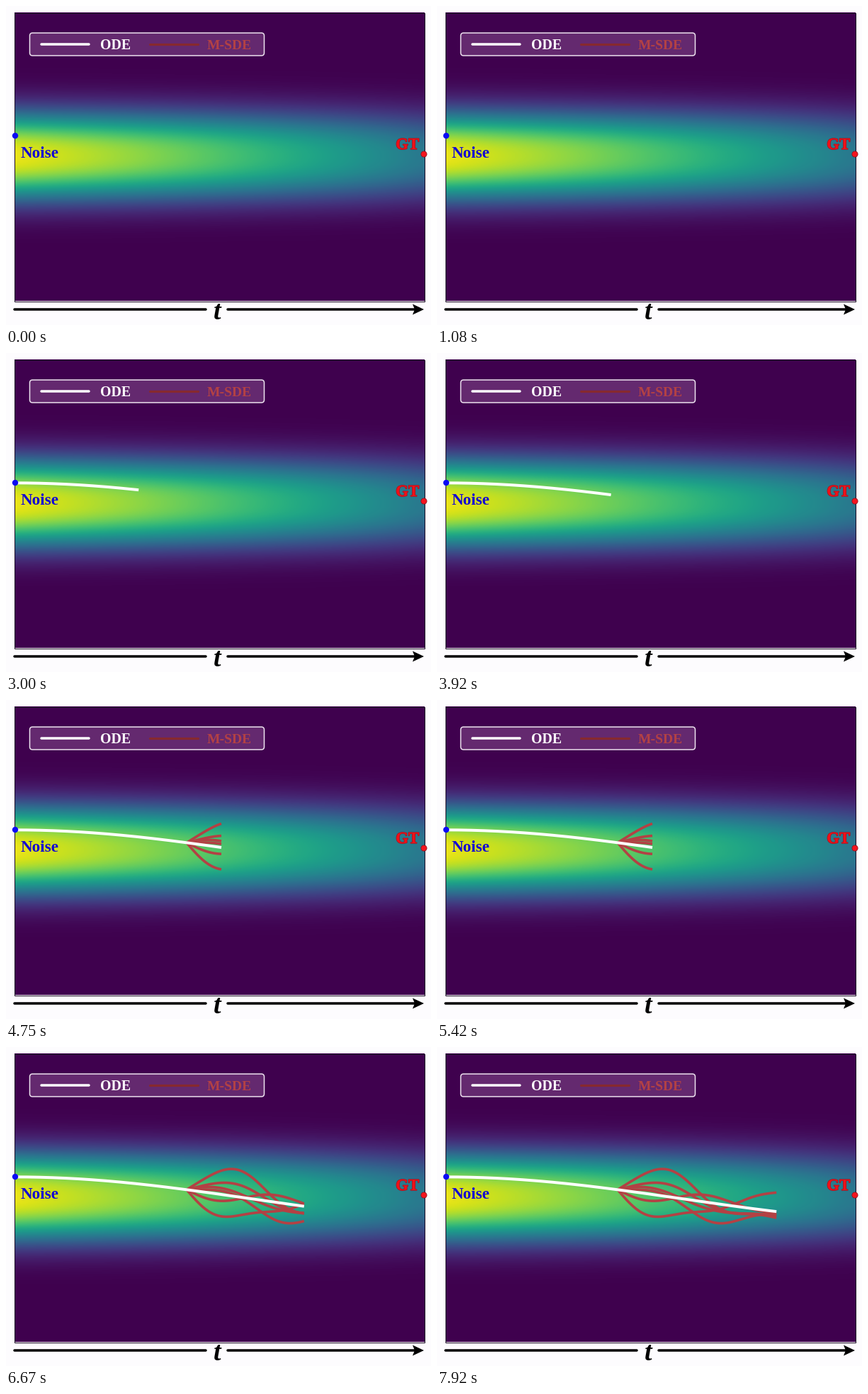
Recreate the animation shown at these times as a matplotlib script. Size 600 by 450 pixels, loop 8000 ms.

```python
import numpy as np
import matplotlib.pyplot as plt
from matplotlib import patheffects
from matplotlib.animation import FuncAnimation
from matplotlib.patches import Circle, FancyBboxPatch, Polygon, Rectangle

W, H, DPI = 600, 450, 100
FRAMES, LOOP_MS = 96, 8000
LEFT, RIGHT, TOP, BOTTOM = 11.5, 590.5, 9.5, 416.5
FIRST_STEP, STEP_FRAMES, STEP_PX = 16, 10, 58.4
START_X, BRANCH_X, BRANCH_SPAN = 12, 255, 225
RED = "#b34144"

# Each strand: final offset from the ODE path, then its sine mode amplitudes.
STRANDS = [
    (9, -22, -21, -3, 4),
    (6, -8, -12, -2, 2),
    (4, 1, -8, -3, 0),
    (4, 13, -11, -5, 3),
    (2, -4, 6, 6, 0),
    (-27, 33, 11, 4, 4),
]


def px(size):
    return size * 72 / DPI


def ode_path(x):
    return 183.3 + 30.8 * (1 - np.cos(0.0047 * (x - START_X)))


def strand_path(x, drift, *modes):
    p = (x - BRANCH_X) / BRANCH_SPAN
    waves = sum(a * np.sin(k * np.pi * p) for k, a in enumerate(modes, 1))
    return ode_path(x) + drift * p + waves


def density_rgb():
    u = np.linspace(0, 1, 579)[None, :]
    y = np.linspace(TOP, BOTTOM, 407)[:, None]
    peak = 0.97 - 0.42 * u - 0.15 * u ** 2
    value = peak * np.exp(-np.abs((y - 212) / 61) ** 2.4)
    shade = np.minimum(1, 0.93 + 0.2 * value)
    return plt.get_cmap("viridis")(value)[..., :3] * shade[..., None]


fig = plt.figure(figsize=(W / DPI, H / DPI), dpi=DPI, facecolor="#fdfcfe")
ax = fig.add_axes([0, 0, 1, 1])


def label(x, y, text, size, color, **kw):
    return ax.text(x, y, text, fontsize=px(size), color=color, weight="bold",
                   family="Liberation Serif", va="baseline", zorder=6, **kw)


def stroke(xs, ys, color, width, cap="round", **kw):
    return ax.plot(xs, ys, color=color, lw=px(width), solid_capstyle=cap, **kw)[0]


def rule(x0, x1, y, color, width):
    stroke([x0, x1], [y, y], color, width)


ax.imshow(density_rgb(), aspect="auto", extent=(LEFT, RIGHT, BOTTOM, TOP),
          interpolation="nearest")
ax.set(xlim=(0, W), ylim=(H, 0))
ax.axis("off")
ax.add_patch(Rectangle((LEFT, TOP), RIGHT - LEFT, BOTTOM - TOP, fill=False,
                       ec="#1a0a24", lw=px(1)))

# Legend
ax.add_patch(FancyBboxPatch((33.5, 38), 331, 32, fc="#64296f", ec="#eee4f0",
                            boxstyle="round,pad=0,rounding_size=4", lw=px(1.5)))
rule(50, 117, 54, "white", 3.5)
rule(203, 271, 54, "#86292f", 3.2)
label(133.3, 61, "ODE", 19.8, "white")
label(284, 61, "M-SDE", 19.5, RED)

# Time axis
rule(12, 282, 428, "black", 3.5)
rule(313, 578, 428, "black", 3.5)
ax.add_patch(Polygon([(574, 420.5), (590, 428), (574, 435.5), (577, 428)], fc="black"))
label(298, 442.5, "t", 38, "black", style="italic", ha="center")

# End points
ax.add_patch(Circle((13, 183), 4.2, fc="#0a0af5", ec="none", zorder=5))
ax.add_patch(Circle((590, 209), 4.1, fc="#f5141e", ec="#8c1420", lw=px(0.8), zorder=5))
label(20.5, 213.5, "Noise", 23.1, "#1408d2")
label(550.2, 202, "GT", 22.9, "#f01018", path_effects=[
    patheffects.withStroke(linewidth=px(1.4), foreground="#a01420")])

strands = [stroke([], [], RED, 3.6, "butt", zorder=3) for _ in STRANDS]
ode = stroke([], [], "white", 4, "butt", zorder=4)


def draw_to(line, start, tip, path, *args):
    x = np.linspace(start, max(start, tip), 160)
    line.set_data(x, path(x, *args))
    line.set_visible(tip > start)


def update(frame):
    step = max(0, (frame - FIRST_STEP) // STEP_FRAMES + 1)
    tip = START_X + step * STEP_PX
    draw_to(ode, START_X, tip, ode_path)
    for line, shape in zip(strands, STRANDS):
        draw_to(line, BRANCH_X, tip, strand_path, *shape)
    return [*strands, ode]


anim = FuncAnimation(fig, update, frames=FRAMES, interval=LOOP_MS / FRAMES,
                     repeat=True, repeat_delay=0)
plt.show()
```
